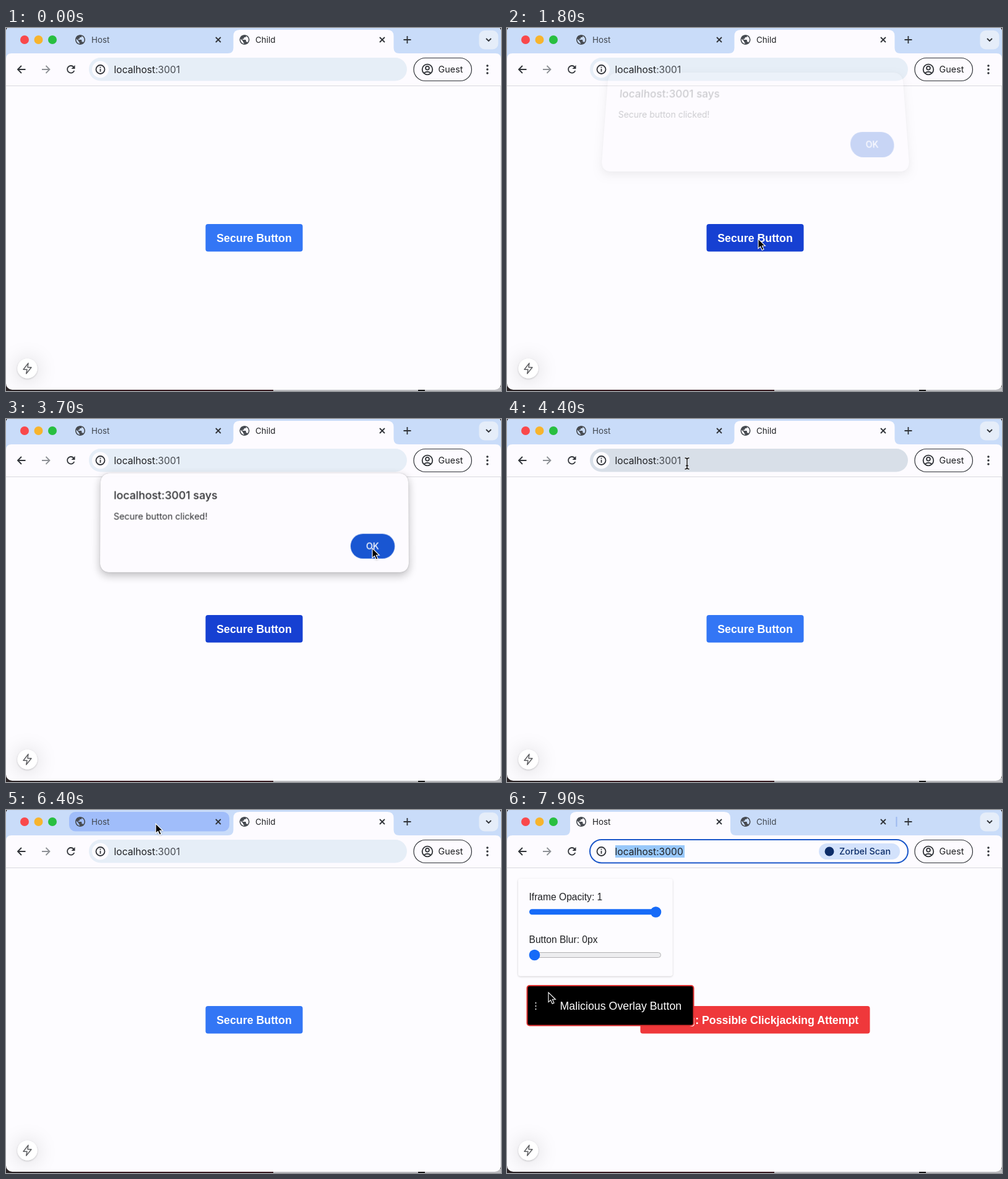
These frames come from a looping animation (800x587 px, 8 s). An HTML page:

```html
<!DOCTYPE html>
<html lang="en">
<head>
<meta charset="utf-8">
<title>Secure button demo</title>
<style>
  html, body { margin: 0; width: 100%; height: 100%; overflow: hidden; background: #fdfcff; }
  svg { position: absolute; left: 0; top: 0; width: 800px; height: 587px; overflow: hidden; }
  text { font-family: Inter, sans-serif; fill: #1f2023; white-space: pre; }
  .page text { font-family: "Liberation Sans", Arial, sans-serif; }
  .line { fill: none; stroke: #303338; stroke-width: 1.8; }
  .tab text { font-size: 13.4px; }
  .label { font-size: 15.6px; }
  .page .caption { font-size: 17.8px; fill: #fff; }
  .bold { font-weight: 700; }
  #dialog {
    position: absolute; left: 152px; top: 89px; width: 499px; height: 160px;
    border-radius: 14px; background: #fdfbff; transform-origin: 50% 100%;
    box-shadow: 0 0 1px rgba(0,0,0,.5), 0 5px 14px rgba(0,0,0,.28);
  }
  #dialog svg { width: 499px; height: 160px; }
</style>
</head>
<body>
<svg viewBox="0 0 800 587">
  <defs>
    <clipPath id="windowShape"><rect y="-4" width="800" height="589" rx="10"/></clipPath>
    <filter id="halo" x="-200%" y="-200%" width="500%" height="500%">
      <feDropShadow dx="0" dy="1" stdDeviation="1.5" flood-opacity=".22"/>
      <feDropShadow dx="0" dy="2" stdDeviation="16" flood-opacity=".16"/>
    </filter>
    <filter id="soft"><feDropShadow dx="0" dy="1" stdDeviation="1.4" flood-opacity=".2"/></filter>
    <path id="tabShape" fill="#fdfbff" d="M-9 41q9 0 9-9V13q0-10 10-10H249q10 0 10 10V32q0 9 9 9z"/>
    <path id="cross" class="line" d="M-4-4l8 8M4-4l-8 8"/>
    <path id="globe" fill="#474b51" transform="scale(.8) translate(-12 -12)" d="M12 2C6.48 2 2 6.48 2 12s4.48 10 10 10 10-4.48 10-10S17.52 2 12 2zm-1 17.93c-3.95-.49-7-3.85-7-7.93 0-.62.08-1.21.21-1.79L9 15v1c0 1.1.9 2 2 2v1.93zm6.9-2.54c-.26-.81-1-1.39-1.9-1.39h-1v-3c0-.55-.45-1-1-1H8v-2h2c.55 0 1-.45 1-1V7h2c1.1 0 2-.9 2-2v-.41c2.93 1.19 5 4.06 5 7.41 0 2.08-.8 3.97-2.1 5.39z"/>
  </defs>

  <!-- Desktop showing behind the window -->
  <rect width="800" height="587" fill="#2a2325"/>
  <rect x="104" y="580" width="328" height="7" fill="#35191f"/>
  <rect x="432" y="580" width="368" height="7" fill="#bcbcbf"/>
  <rect x="666" y="580" width="11" height="7" fill="#151515"/>

  <g clip-path="url(#windowShape)">
    <rect width="800" height="587" fill="#fdfcff"/>
    <rect width="800" height="60" fill="#c9dcf9"/>
    <path d="M0 93V50q0-9 9-9H791q9 0 9 9V93z" fill="#fdfbff"/>
    <path d="M0 93.5H800" stroke="#dadade"/>

    <circle cx="30" cy="19" r="7" fill="#f9484b"/>
    <circle cx="52.5" cy="19" r="7" fill="#f7b42d"/>
    <circle cx="75" cy="19" r="7" fill="#28bf40"/>
    <rect id="tabHover" x="102" y="3" width="259" height="31.5" rx="10" fill="#a0bdfa"/>
    <use id="activeTab" href="#tabShape"/>
    <g class="tab">
      <use href="#globe" x="120" y="19" id="hostGlobe"/>
      <text id="hostTitle" x="138" y="23.5">Host</text>
      <use href="#cross" x="343" y="19"/>
      <use href="#globe" x="385.5" y="19"/>
      <text id="childTitle" x="403" y="23.5">Child</text>
      <use href="#cross" x="608" y="19"/>
    </g>
    <path id="tabDivider" d="M629.5 11v16" stroke="#9db9ef" stroke-width="2"/>
    <path class="line" d="M642.5 19h12M648.5 13v12"/>
    <rect x="764.5" y="4" width="31" height="30.5" rx="9" fill="#e5edf9"/>
    <path class="line" d="M776 17l4 4 4-4"/>

    <path class="line" d="M31.5 67H19M25 61l-6 6 6 6"/>
    <path class="line" d="M58 67H70.500M64.500 61l6 6-6 6" style="stroke:#8e9196"/>
    <path class="line" d="M110.300 69A5.800 5.800 0 1 1 109.200 62.900"/>
    <path d="M111.500 60v6h-6z" fill="#303338"/>
    <rect id="addressBar" x="134" y="48" width="514" height="37.500" rx="18.750"/>
    <circle cx="152.500" cy="67" r="13.500" fill="#fdfcff"/>
    <circle class="line" cx="152.500" cy="67" r="7"/>
    <path class="line" d="M152.500 66v4.800M152.500 62.800v1.800"/>
    <rect id="selection" x="175" y="57" width="112" height="20" fill="#98c8fa"/>
    <text x="174.500" y="72.500" class="label">localhost<tspan id="port"></tspan></text>
    <g id="searchChip">
      <rect x="504" y="54" width="131" height="26" rx="13" fill="#d3e2fc"/>
      <circle cx="521" cy="67" r="7.500" fill="#0d2d69"/>
      <text x="537" y="72.300" font-size="14.400" font-weight="500" style="fill:#0d2d69">Zorbel Scan</text>
    </g>
    <rect class="line" x="659" y="48.500" width="93.500" height="37" rx="18.500" style="stroke-width:1.200"/>
    <g class="line">
      <circle cx="681" cy="67" r="8.300"/>
      <circle cx="681" cy="64.700" r="2.900"/>
      <path d="M675.300 73q5.700-4.600 11.400 0"/>
    </g>
    <text x="698.500" y="72.300" font-size="14.400">Guest</text>
    <path d="M778 61v.01M778 67v.01M778 73v.01" stroke="#303338" stroke-width="3.500" stroke-linecap="round"/>

    <g class="page" id="childPage">
      <rect id="secureButton" x="322.500" y="317" width="157" height="44.500" rx="4"/>
      <text x="401" y="345.500" text-anchor="middle" class="caption bold">Secure Button</text>
    </g>

    <g class="page" id="hostPage">
      <rect x="18" y="111" width="249.500" height="157.500" rx="4" fill="#fdfcff" filter="url(#soft)"/>
      <text x="35.500" y="145.500" class="label">Iframe Opacity: 1</text>
      <rect x="36" y="160.300" width="213" height="9" rx="4.500" fill="#176bf8"/>
      <circle cx="240.500" cy="165" r="8.800" fill="#176bf8"/>
      <text x="35.500" y="215" class="label">Button Blur: 0px</text>
      <rect x="36.500" y="230.500" width="212" height="8" rx="4" fill="#ededef" stroke="#b2b2b4"/>
      <circle cx="44.500" cy="234.500" r="8.800" fill="#176bf8"/>
      <rect x="215.500" y="317" width="371" height="44.500" rx="4" fill="#ef383b"/>
      <text x="401" y="345.500" text-anchor="middle" class="caption bold">Warning: Possible Clickjacking Attempt</text>
      <rect x="32.500" y="284" width="269" height="64.500" rx="4" stroke="#dd2f2f" stroke-width="2"/>
      <path d="M46.500 312v.01M46.500 317v.01M46.500 322v.01" stroke="#fff" stroke-width="2" stroke-linecap="round"/>
      <text x="85.500" y="322.500" class="caption">Malicious Overlay Button</text>
    </g>

    <circle cx="34.500" cy="550.500" r="16" fill="#fff" filter="url(#halo)"/>
    <path d="M36 542l-8 10.200h6l-1.300 6.800 8.300-10.200h-6z" fill="none" stroke="#5f6063" stroke-width="1.500" stroke-linejoin="round"/>
    <path d="M799.500 94V587" stroke="#dcdce0"/>
  </g>
</svg>

<div id="dialog">
  <svg viewBox="152 89 499 160">
    <text x="173.500" y="131" font-size="17.800" font-weight="500">localhost:3001 says</text>
    <text x="173.500" y="163.700" font-size="14.400">Secure button clicked!</text>
    <rect x="557" y="187" width="71.500" height="40" rx="20" fill="#0a4bcf"/>
    <text x="592.500" y="212.500" font-size="14.500" font-weight="500" text-anchor="middle" style="fill:#fff">OK</text>
  </svg>
</div>

<svg viewBox="0 0 800 587">
  <g id="cursor">
    <path id="arrow" d="M0 0V15.600l3.600-3.300 2.600 5.900 2.800-1.200-2.600-5.700h5z" stroke="#fff" stroke-width="1.100" filter="url(#soft)"/>
    <g id="beam" fill="none">
      <path d="M-3.500-9q3.500 0 3.500 2.500V6.500q0 2.500-3.500 2.500M3.500-9Q0-9 0-6.500V6.500Q0 9 3.500 9M-2 3.500h4" stroke="#fff" stroke-width="3" opacity=".7"/>
      <path d="M-3.500-9q3.500 0 3.500 2.500V6.500q0 2.500-3.500 2.500M3.500-9Q0-9 0-6.500V6.500Q0 9 3.500 9M-2 3.500h4" stroke="#111" stroke-width="1.400"/>
    </g>
  </g>
</svg>

<script>
const LOOP = 8000, STEP = 100, HOST_OPENS = 6800;
const DIALOG_OPENS = 1760, DIALOG_CLOSES = 3690, DIALOG_FADE = 180;

// Pointer stops: time, x, y
const POINTER = [
  [400, 312, 592], [1200, 404, 343], [1800, 406, 341], [2600, 406, 341],
  [3000, 530, 247], [3400, 592, 209], [3700, 592, 209], [4400, 291, 72],
  [4800, 262, 100], [5500, 260, 128], [5900, 257, 112], [6400, 242, 22],
  [6900, 240, 22], [7600, 76, 280], [7900, 67, 295]
];

const $ = id => document.getElementById(id);
const clamp = v => Math.min(1, Math.max(0, v));
const show = (id, on) => { $(id).style.display = on ? "" : "none"; };
const inside = ([x, y], left, top, right, bottom) =>
  x >= left && x <= right && y >= top && y <= bottom;

function pointerAt(time) {
  const next = POINTER.findIndex(stop => stop[0] > time);
  if (next === 0) return POINTER[0].slice(1);
  if (next < 0) return POINTER.at(-1).slice(1);
  const [t0, x0, y0] = POINTER[next - 1], [t1, x1, y1] = POINTER[next];
  const u = (time - t0) / (t1 - t0), eased = u * u * (3 - 2 * u);
  return [x0 + (x1 - x0) * eased, y0 + (y1 - y0) * eased];
}

function drawDialog(time) {
  const opening = clamp((time - DIALOG_OPENS) / DIALOG_FADE);
  const closing = clamp((time - DIALOG_CLOSES) / DIALOG_FADE);
  const shown = opening * (1 - closing);
  const tilt = (1 - shown) / 0.78;
  const dialog = $("dialog");
  show("dialog", shown > 0);
  dialog.style.opacity = shown;
  // The sheet swings down into place, its top edge leaning away
  dialog.style.transform = shown === 1 ? "none" :
    `matrix3d(1,0,0,0, 0,${1 + 0.057 * tilt},0,${-0.000316 * tilt}, 0,0,1,0, 0,${-17 * tilt},0,1)`;
  return shown > 0;
}

function render(time) {
  const host = time >= HOST_OPENS;
  const point = pointerAt(time);
  const dialogOpen = drawDialog(time);
  const overBar = inside(point, 134, 48, 648, 86);
  const onButton = inside(point, 322, 317, 479, 361);
  const pressed = onButton || dialogOpen;

  show("hostPage", host);
  show("childPage", !host);
  show("selection", host);
  show("searchChip", host);
  show("tabDivider", host);
  show("tabHover", !host && inside(point, 102, 3, 361, 35));
  $("activeTab").setAttribute("x", host ? 102 : 367.5);
  $("hostTitle").style.fill = host ? "#1f2023" : "#414750";
  $("childTitle").style.fill = host ? "#414750" : "#1f2023";
  $("port").textContent = host ? ":3000" : ":3001";
  $("port").style.fill = host ? "#1f2023" : "#474b51";
  $("secureButton").style.fill = pressed ? "#1640d2" : "#3376f5";

  const bar = $("addressBar").style;
  bar.fill = host ? "#fdfcff" : overBar && !dialogOpen ? "#d8dfe8" : "#e6eef7";
  bar.stroke = host ? "#1b57c9" : "none";
  bar.strokeWidth = 2;

  show("arrow", !overBar);
  show("beam", overBar);
  $("cursor").setAttribute("transform", `translate(${point})`);
}

function tick(now) {
  render(Math.floor((now % LOOP) / STEP) * STEP);
  requestAnimationFrame(tick);
}
render(0);
requestAnimationFrame(tick);
</script>
</body>
</html>
```
